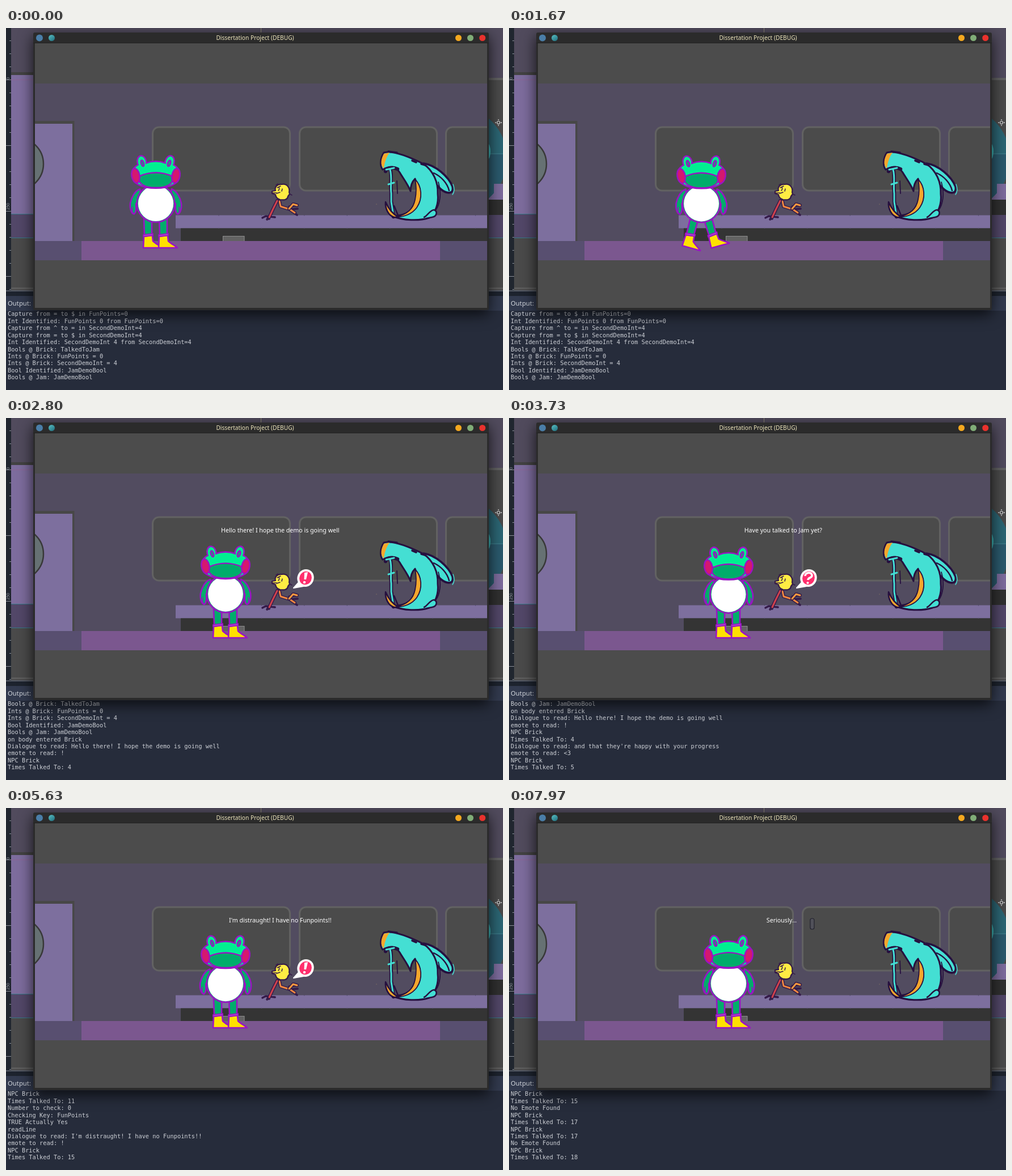
Recreate the animation shown at these times as an HTML page with a canvas. Size 876 px wide and 639 px high, loop 8000 ms.

```html
<!DOCTYPE html>
<html lang="en">
<head>
<meta charset="utf-8">
<title>Dissertation Project</title>
<style>
html, body { margin: 0; width: 100%; height: 100%; overflow: hidden; background: #262c3b; }
canvas { display: block; }
</style>
</head>
<body>
<canvas id="stage" width="876" height="639"></canvas>
<script>
const W = 876, H = 639, LOOP = 8000;
const SANS = '"Noto Sans", "Open Sans", sans-serif';
const MONO = '"DejaVu Sans Mono", monospace';
const ctx = document.getElementById('stage').getContext('2d');
let g = ctx;

function rect(x1, y1, x2, y2, color) {
  g.fillStyle = color;
  g.fillRect(x1, y1, x2 - x1, y2 - y1);
}

function paint(path, fill, stroke, width = 2) {
  if (fill) { g.fillStyle = fill; g.fill(path); }
  if (stroke) { g.strokeStyle = stroke; g.lineWidth = width; g.stroke(path); }
}

const shape = (d, fill, stroke, width) => paint(new Path2D(d), fill, stroke, width);

function oval(x, y, rx, ry, fill, stroke, width, turn = 0) {
  const p = new Path2D();
  p.ellipse(x, y, rx, ry, turn, 0, Math.PI * 2);
  paint(p, fill, stroke, width);
}

function rounded(x, y, w, h, r, fill, stroke, width) {
  const p = new Path2D();
  p.roundRect(x, y, w, h, r);
  paint(p, fill, stroke, width);
}

function text(str, x, y, size, color, family = SANS, align = 'left') {
  g.font = `${size}px ${family}`;
  g.textAlign = align;
  g.fillStyle = color;
  g.fillText(str, x, y);
}

function layer(draw) {
  const c = document.createElement('canvas');
  c.width = W;
  c.height = H;
  g = c.getContext('2d');
  draw();
  g = ctx;
  return c;
}

function mirrored(draw) {
  for (const side of [-1, 1]) {
    g.save();
    g.scale(side, 1);
    draw();
    g.restore();
  }
}

function editor() {
  rect(0, 0, W, 463, '#514b5d');
  rect(449, 0, 450, 9, '#8d8a72');
  // left edge of the scene view
  rect(9, 78, 51, 83, '#424242');
  rect(9, 83, 51, 328, '#7d6c9d');
  rect(9, 91, 51, 92, '#8a6494');
  rect(9, 328, 51, 370, '#524768');
  rect(9, 328, 51, 329, '#36798a');
  rect(9, 370, 51, 371, '#36798a');
  rect(9, 371, 51, 463, '#4a4a4a');
  rect(9, 458, 51, 461, '#5c5c5c');
  // right edge
  rect(848, 88, W, 92, '#626262');
  rect(848, 92, W, 275, '#4b4b4b');
  rect(848, 275, W, 303, '#7d6c9d');
  oval(790, 230, 93, 93, '#2c6674');
  g.save();
  g.beginPath();
  g.rect(848, 222, 28, 81);
  g.clip();
  oval(790, 230, 93, 93, '#2b5a6d');
  g.restore();
  rect(848, 221, W, 223, '#377482');
  oval(849, 218, 5, 14, '#3fb9bb');
  rect(860, 275, W, 303, '#7d6c9d');
  rect(848, 303, W, 330, '#303030');
  rect(848, 330, W, 370, '#524768');
  rect(848, 370, W, 371, '#36798a');
  rect(848, 371, W, 463, '#4a4a4a');
  rect(848, 458, W, 461, '#5c5c5c');
  oval(868, 167, 2.5, 2.5, null, '#ddd', 1.2);
  shape('M862 167h2M872 167h2M868 161v2M868 171v2', null, '#ddd', 1.3);
  // ruler
  rect(0, 0, 9, 463, '#20262f');
  for (let i = -3; i < 17; i++) {
    const y = Math.round(91 + i * 23.15);
    rect(i % 5 ? 6 : 0, y, 9, y + 1, '#8b9099');
  }
  for (const [label, y] of [['0', 91], ['250', 321]]) {
    g.save();
    g.translate(6, y);
    g.rotate(-Math.PI / 2);
    text(label, 0, 0, 7, '#9a9fa8');
    g.restore();
  }
  // output panel
  rect(0, 463, W, 465, '#555b66');
  rect(0, 465, W, 473, '#1d232e');
  rect(0, 473, W, 499, '#323a4e');
  rect(0, 499, W, H, '#262c3b');
  text('Output:', 3, 490, 11.3, '#d3d7de');
}

function gameWindow() {
  g.save();
  g.shadowColor = 'rgba(0,0,0,.75)';
  g.shadowBlur = 26;
  g.shadowOffsetY = 7;
  rounded(48, 8, 803, 490, 3, '#2b2b2b');
  g.restore();
  rect(48, 26, 851, 27, '#222');
  oval(59, 17.5, 6, 6, '#4a7ea8');
  const ball = g.createLinearGradient(76, 12, 84, 23);
  ball.addColorStop(0, '#55bcc0');
  ball.addColorStop(1, '#247483');
  oval(80.5, 17.5, 5.5, 5.5, ball);
  oval(797.5, 17.5, 5.5, 5.5, '#f3a81f');
  oval(818.5, 17.5, 5.5, 5.5, '#80ad77');
  oval(839.7, 17.5, 5.5, 5.5, '#e9322d');
  text('Dissertation Project (DEBUG)', 439, 21, 10.2, '#eee6bd', SANS, 'center');

  g.save();
  g.beginPath();
  g.rect(51, 27, 797, 467);
  g.clip();
  rect(51, 27, 848, 494, '#4c4c4c');
  rect(51, 98, 848, 376, '#524c60');
  // door
  rect(51, 164, 120.5, 376, '#474747');
  rect(51, 169, 117, 376, '#7d6f9e');
  oval(20, 240, 46, 46, '#667173', '#383838', 2.5);
  // windows
  for (const x of [258.5, 517.5, 775.5])
    rounded(x, 175, 242, 112, 11, '#4b4b4b', '#626262', 3);
  // bench
  rect(299, 330.5, 848, 353.5, '#7d6f9e');
  rect(308, 353.5, 848, 376, '#343434');
  for (let x = 374.5; x < 848; x += 75.4) {
    rect(x, 330, x + 1, 331.5, '#4b4562');
    rect(x, 352.5, x + 1, 354, '#625781');
  }
  rect(382, 367, 420.5, 376, '#8d8d8d');
  rect(383, 368, 419.5, 376, '#626262');
  // floor
  rect(51, 376, 848, 410, '#584f70');
  rect(133, 376, 765, 410, '#7b578f');
  rabbit();
  g.restore();
}

function rabbit() {
  const ink = '#26103f', teal = '#44dfd3', amber = '#f4a72c';
  g.lineJoin = g.lineCap = 'round';
  // ear
  shape('M736 239C757 242 780 262 787 280C790 294 777 293 767 285C757 277 750 264 742 254Z', teal, ink, 3.6);
  shape('M754 256C767 262 778 274 781 287', null, ink, 2.4);
  shape('M788 276C791 284 790 290 787 294', null, teal, 1.5);
  // head with its hanging lip, back and lower jaw
  shape('M666 220C684 215 716 230 736 240C753 252 762 272 761 293C763 309 757 327 746 335C728 341 700 340 681 332C708 331 722 320 725 301C727 287 725 275 721 266C715 272 713 280 713 288C708 275 699 264 694 255C688 246 676 242 664 250C658 243 660 229 666 220Z', teal, ink, 3);
  shape('M666 222L676 220C670 228 667 239 666 248C659 242 661 231 666 222Z', amber);
  shape('M721 267C733 279 735 301 724 317C716 328 702 334 688 333C708 329 718 319 721 303C724 288 723 276 721 267Z', amber, ink, 1.8);
  shape('M674 218L689 220M716 234L723 237M732 240L739 242', null, ink, 3.6);
  // strands and jaw tip
  shape('M669 253C671 246 682 245 690 249M677 248C681 262 677 276 679 290L679 306L683 333', null, ink, 6.4);
  shape('M670 250L684 247M677 250C681 264 677 278 679 292L679 307L683 331M674 276L684 273', null, teal, 3);
  shape('M689 270L690 292', null, ink, 1.8);
  shape('M669 307C668 319 674 331 684 334L692 334C681 328 674 319 669 307Z', amber, ink, 2.6);
  shape('M684 314L692 333', null, ink, 2.6);
  // feet
  shape('M737 334C743 331 747 322 754 321C762 323 759 333 751 334L741 336', teal, ink, 2.6);
  shape('M762 272C768 292 765 312 757 322', null, ink, 1.8);
  rect(652, 310, 654, 312, '#655b61');
}

function bird(stretch) {
  const ink = '#351b49';
  g.save();
  g.translate(0, 340);
  g.scale(1, stretch);
  g.translate(0, -340);
  g.lineJoin = g.lineCap = 'round';
  const limb = (d, color) => {
    shape(d, null, ink, 6);
    shape(d, null, color, 3);
  };
  shape('M452 335L458 332L474 334M464 331L460 338M461 337L464 337', null, ink, 3.6);
  shape('M499 315L513 313M507 326L513 330M502 320L514 319', null, ink, 3.6);
  limb('M482 306L484 315L500 320L509 326', '#ef8740');
  limb('M499 319L506 311L513 313', '#f5993f');
  limb('M478 305L471 319L464 334', '#cf424d');
  shape('M486 276C495 274 501 282 499 290L500 293L497 297C496 304 489 304 483 303C478 301 475 298 475 294L469 292L469 288L475 287C473 281 478 275 486 276Z', '#ffec43', ink, 2.2);
  shape('M478 282L484 279M480 287C482 285 482 283 481 281M477 292L483 290M487 284L486 288', null, ink, 1.5);
  shape('M469 291L477 291M476 277L479 275M500 293L504 295', null, ink, 1.5);
  g.restore();
}

// x is the belly centre, breath runs -1..1, swing is the leg angle
function frog(x, breath, swing) {
  const line = '#9b13c4', dark = '#00ad6b', light = '#00ef91';
  const dy = breath * 1.5, arm = breath * 1.2;
  g.save();
  g.translate(x, 0);
  g.lineJoin = g.lineCap = 'round';

  const leg = (lx, angle) => {
    g.save();
    g.translate(lx, 342);
    g.rotate(angle);
    shape('M-7 -6L7 -6L7 24L-6 24Z', dark, line, 2.6);
    shape('M-7 26L8 24L9 34C14 39 21 42 25 46L-8 46Z', '#ffe100', line, 2.6);
    shape('M-8 23L9 21L9 24L-8 26Z', '#b56fd0', line, 2);
    g.restore();
  };
  leg(-14, swing);
  leg(13, -swing);

  mirrored(() => {
    g.translate(-arm, dy * .6);
    shape('M27 285C36 288 42 300 44 310C45 320 42 329 37 329C33 325 33 318 34 311L25 300Z', dark, line, 2.6);
    shape('M39 328C41 325 41 322 40 317', null, line, 1.6);
  });
  oval(0, 310.5 + dy * .6, 33 - breath * .4, 33, dark, line, 2.6);
  oval(0, 310.5 + dy * .6, 30.8 - breath * .4, 31.3, '#fff');

  g.translate(0, dy);
  mirrored(() => oval(24.5, 238, 8, 11.5, light, line, 2.6, .22));
  shape('M-42 262C-43 247 -32 240 -18 240Q0 233 18 240C32 240 43 247 42 262C41 275 26 284 0 284C-26 284 -41 275 -42 262Z', light, line, 2.6);
  shape('M-29 263Q0 250 29 263C33 276 20 283 0 283C-20 283 -33 276 -29 263Z', dark, line, 2.4);
  mirrored(() => {
    oval(24.5, 239, 6.4, 9.8, light, null, 0, .22);
    oval(23.5, 240, 2.4, 5.5, '#12a878', line, 2.4, .3);
    oval(35.5, 262, 7, 13, '#d5186f', line, 2.4, .18);
  });
  g.restore();
}

function bubble(mark) {
  g.lineJoin = 'round';
  shape('M507 300L516 290L524 297Z', '#fff', '#fff', 2);
  oval(528, 282.5, 12.6, 13.8, '#ff2e6d', '#fff', 3.8, .4);
  if (mark === '<3')
    shape('M527 291C517 283 519 274 525 275Q528 276 528 279Q530 275 534 276C539 279 535 286 527 291Z', '#fff');
  else if (mark === '!') {
    shape('M526 273L532 272L529 285L525.5 285Z', '#fff');
    oval(526, 290, 2.2, 2.2, '#fff');
  } else {
    shape('M522 279C522 272 534 271 534 278C534 283 527 281 527 286', null, '#fff', 3.6);
    oval(526.5, 291, 2.1, 2.1, '#fff');
  }
}

const speech = [
  [2470, 'Hello there! I hope the demo is going well', '!'],
  [3130, "and that they're happy with your progress", '<3'],
  [3730, 'Have you talked to Jam yet?', '?'],
  [4600, 'Oh I guess not...', ''],
  [5570, "I'm distraught! I have no Funpoints!!", '!'],
  [7170, 'I have zero Funpoints...', ''],
  [7600, 'Seriously...', '']
];

const talk = (n, times = 1) => Array(times).fill(['NPC Brick', 'Times Talked To: ' + n]).flat();
const said = i => ['Dialogue to read: ' + speech[i][1], 'emote to read: ' + speech[i][2]];
const log = [
  [0, ['Capture from = to $ in FunPoints=0', 'Int Identified: FunPoints 0 from FunPoints=0',
    'Capture from ^ to = in SecondDemoInt=4', 'Capture from = to $ in SecondDemoInt=4',
    'Int Identified: SecondDemoInt 4 from SecondDemoInt=4', 'Bools @ Brick: TalkedToJam',
    'Ints @ Brick: FunPoints = 0', 'Ints @ Brick: SecondDemoInt = 4',
    'Bool Identified: JamDemoBool', 'Bools @ Jam: JamDemoBool']],
  [2000, ['on body entered Brick']],
  [2470, [...said(0), ...talk(4)]],
  [3130, [...said(1), ...talk(5)]],
  [3770, [...said(2), ...talk(6)]],
  [4600, talk(11, 4)],
  [4700, talk(11)],
  [5570, ['Number to check: 0', 'Checking Key: FunPoints', 'TRUE Actually Yes', 'readLine', ...said(4), ...talk(15)]],
  [5900, talk(15)],
  [7170, ['No Emote Found', ...talk(17)]],
  [7400, talk(17)],
  [7600, ['No Emote Found', ...talk(18)]]
];

function consoleText(t) {
  const lines = log.filter(([at]) => at <= t).flatMap(entry => entry[1]).slice(-10);
  lines.forEach((s, i) => text(s, 3, 508.3 + i * 12.44, 10.35, '#cdd0d6', MONO));
}

function dialogue(t) {
  const now = speech.filter(([at]) => at <= t).pop();
  if (!now) return;
  const [, words, mark] = now;
  text(words, mark ? 483.3 : 480.5, 202, 10.65, '#fff', SANS, 'center');
  if (mark) bubble(mark);
  else rounded(481 + g.measureText(words).width - 3.5, 195, 7, 19, 3, '#51515a', '#22222e', 1.2);
}

const clamp = v => Math.min(1, Math.max(0, v));

function frogX(t) {
  return 264 + 117 * clamp((t - 1100) / 890) + 6 * clamp((t - 2230) / 60);
}

const back = layer(editor), front = layer(gameWindow);

function draw(t) {
  g.drawImage(back, 0, 0);
  consoleText(t);
  g.drawImage(front, 0, 0);
  bird(t >= 7900 ? 1.035 : 1);
  const walking = t > 1170 && t < 1990;
  const swing = walking ? .27 * Math.sin((t - 1170) / 820 * Math.PI * 4) : 0;
  const peak = t < 1100 ? 480 : 80;
  frog(frogX(t), Math.cos((t - peak) / 1200 * Math.PI * 2), swing);
  dialogue(t);
}

function tick() {
  draw(performance.now() % LOOP);
  requestAnimationFrame(tick);
}
tick();
</script>
</body>
</html>
```
